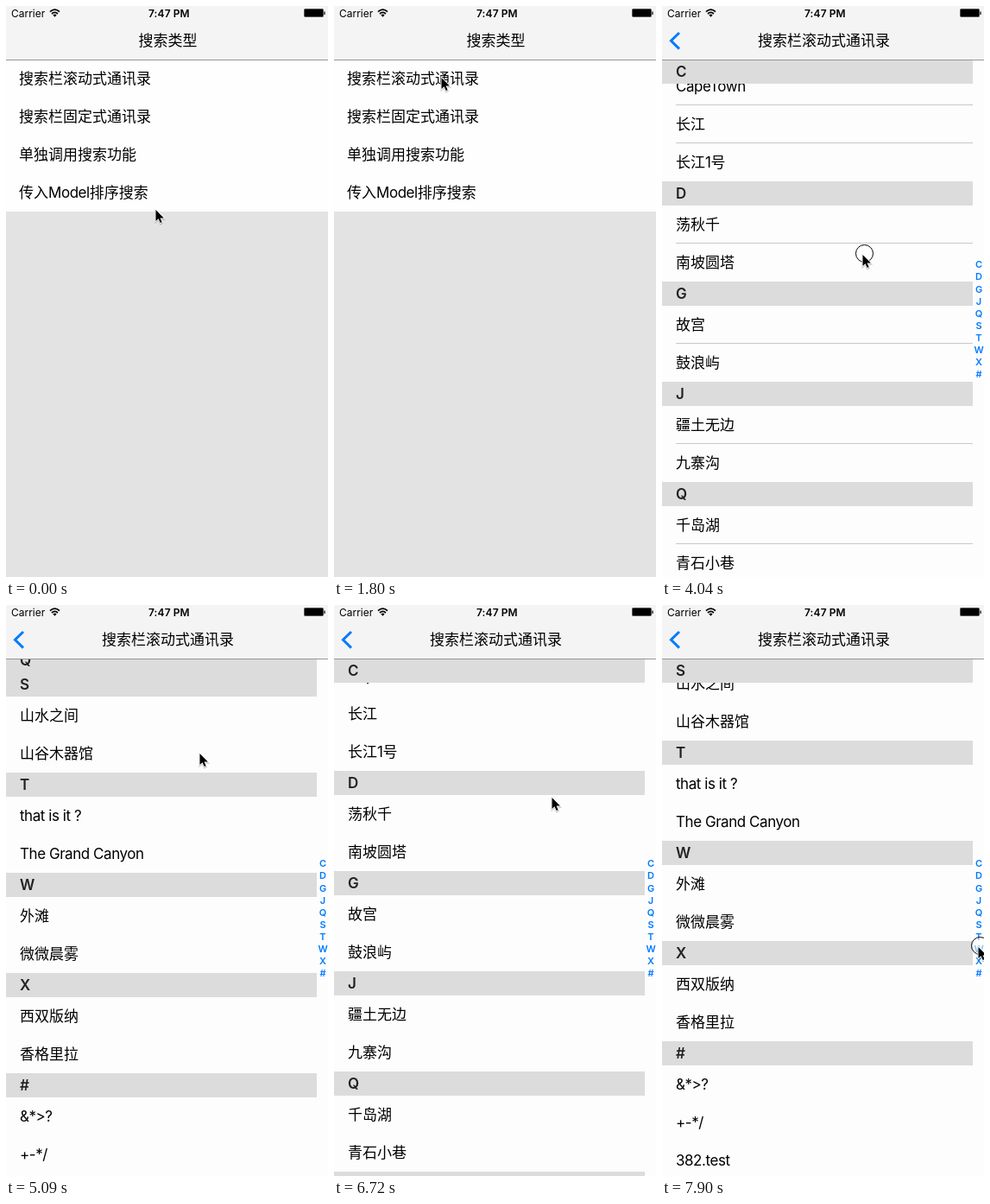
An HTML page that plays this animation: 373x661 px, repeating every 8000 ms.

```html
<!DOCTYPE html>
<html lang="zh-CN">
<head>
<meta charset="utf-8">
<style>
  html, body { margin: 0; width: 100%; height: 100%; overflow: hidden; background: #e3e3e3; }
  #stage { position: absolute; left: 0; top: 0; width: 373px; height: 661px; overflow: hidden;
    font: 17px Inter, "Noto Sans CJK SC", "Noto Sans CJK", sans-serif; color: #000; }
  #stage div, #stage svg { position: absolute; white-space: pre; }
  .latin { letter-spacing: -.45px; }
  .page { left: 0; top: 62px; width: 373px; height: 599px; overflow: hidden; }
  #menu { background: #e3e3e3; }
  #menu .row { left: 0; width: 358px; padding-left: 15px; background: #fefefe; }
  #book { background: #fdfdfd; }
  .row { left: 16px; width: 344px; height: 44px; line-height: 44px; }
  .rule { left: 16px; width: 344px; height: 1px; background: #c8c8c8; }
  .head { left: 0; width: 344px; height: 28px; padding-left: 16px; line-height: 28px;
    background: #dcdcdc; color: #222; font-weight: 600; }
  #search { left: 0; width: 360px; height: 44px; background: #c9c9ce; }
  #search div { left: 8px; top: 8px; width: 344px; height: 28px; border-radius: 5px;
    background: #fefefe; color: #8e8e93; font-size: 14px; line-height: 28px; text-align: center; }
  .key { left: 357px; width: 20px; height: 14px; line-height: 14px; text-align: center;
    font-size: 11px; font-weight: 600; color: #007aff; }
  #bar { left: 0; top: 0; width: 373px; height: 62px; background: #f4f4f4; border-bottom: 1px solid #969696; }
  .title { left: 0; top: 26px; width: 375px; line-height: 28px; text-align: center; font-weight: 500; }
  .status { top: 0; font-size: 12px; line-height: 17px; }
</style>
</head>
<body>
<div id="stage">
  <div id="menu" class="page"></div>
  <div id="book" class="page"><div id="list"><div id="search"><div>搜索</div></div></div></div>
  <div id="bar">
    <div class="status" style="left:6px">Carrier</div>
    <div class="status" style="left:165px;font-weight:600;letter-spacing:.1px">7:47 PM</div>
    <svg width="373" height="62" style="left:0;top:0" fill="none" stroke="#000">
      <path d="M51 6.6Q56.5 1.6 62 6.6M53 9Q56.5 5.8 60 9" stroke-width="1.8"/>
      <path d="M54.4 10.4Q56.5 8.8 58.6 10.4L56.5 12.8Z" fill="#000" stroke="none"/>
      <rect x="345.5" y="3.5" width="22" height="9" rx="1" fill="#000" stroke="#555"/>
      <path d="M369 6.5V10" stroke-width="1.2"/>
      <path id="back" d="M20 31L10.5 40.3L20 49.6" stroke="#007aff" stroke-width="3"/>
    </svg>
    <div id="oldTitle" class="title">搜索类型</div>
    <div id="newTitle" class="title">搜索栏滚动式通讯录</div>
  </div>
  <svg id="mouse" width="40" height="40" style="left:-14px;top:-14px">
    <circle id="ring" cx="16.5" cy="13.5" r="10" fill="#fff" fill-opacity=".5" stroke="#000"/>
    <path d="M14.5 15v13l3-2.8 2.2 4.9 2-.9-2.1-4.7h4.3z" fill="#000" stroke="#fff"
      stroke-width="1.8" paint-order="stroke" style="filter:drop-shadow(0 1px .7px rgba(0,0,0,.3))"/>
  </svg>
</div>
<script>
const TOP = 62, ROW = 44, HEAD = 28, WIDTH = 373, LOOP = 8000;
const REST = TOP + ROW, BOTTOM = 665, KEY_TOP = 292.3, KEY_STEP = 14.1;
const INDEX_DRAG = 7010;
const $ = id => document.getElementById(id);

const sections = {
  C: ['CapeTown', '长江', '长江1号'],
  D: ['荡秋千', '南坡圆塔'],
  G: ['故宫', '鼓浪屿'],
  J: ['疆土无边', '九寨沟'],
  Q: ['千岛湖', '青石小巷'],
  S: ['山水之间', '山谷木器馆'],
  T: ['that is it ?', 'The Grand Canyon'],
  W: ['外滩', '微微晨雾'],
  X: ['西双版纳', '香格里拉'],
  '#': ['&*>?', '+-*/', '382.test']
};

// Places where the pointer turns or rests: [time, x, y]
const stops = [
  [0, 173, 235], [600, 186, 278], [1800, 124, 82], [2300, 124, 82], [3440, 220, 369],
  [3740, 220, 369], [4040, 232, 287], [4500, 224, 171], [5540, 224, 171],
  [6130, 224, 388], [6720, 252, 222], [INDEX_DRAG, 364, 297], [7900, 366, 395]
];
const presses = [[2100, 2250], [3740, 4340], [5690, 6100], [INDEX_DRAG, LOOP]];
const clockStarts = [0, 3290, 5830, 6720, 7010, 7900];

const mix = (a, b, f) => a + (b - a) * f;
const part = (t, from, to) => Math.min(1, Math.max(0, (t - from) / (to - from)));
const smooth = f => f * f * (3 - 2 * f);
const easeOut = f => 1 - (1 - f) ** 2;

function add(parent, cls, text, top) {
  const el = document.createElement('div');
  el.className = cls;
  el.style.top = top + 'px';
  for (const run of text.match(/[ -~]+|[^ -~]+/g) || []) {
    const span = document.createElement('span');
    span.textContent = run;
    if (cls === 'row' && /[ -~]/.test(run)) span.className = 'latin';
    el.append(span);
  }
  parent.append(el);
  return el;
}

const menuRows = ['搜索栏滚动式通讯录', '搜索栏固定式通讯录', '单独调用搜索功能', '传入Model排序搜索']
  .map((text, i) => add($('menu'), 'row', text, i * ROW));

const list = $('list'), heads = [], rules = [];
let height = 0;
Object.entries(sections).forEach(([key, names], i) => {
  const start = height;
  height += HEAD;
  names.forEach((name, n) => {
    add(list, 'row', name, height);
    height += ROW;
    if (n < names.length - 1) rules.push(add(list, 'rule', '', height - 1));
  });
  heads.push({ start, end: height, key });
  add($('book'), 'key', key, KEY_TOP - TOP + i * KEY_STEP);
});
for (const h of heads) h.el = add(list, 'head', h.key, 0);
$('search').style.top = -ROW + 'px';
const END = BOTTOM - height;

// The picture advances in 150 ms steps, restarted at a few points
function step(t) {
  const start = clockStarts.filter(s => s <= t).pop();
  return start + Math.floor((t - start) / 150) * 150;
}

function pointerAt(t) {
  const n = stops.findIndex(s => s[0] > t);
  if (n < 0) return stops[stops.length - 1].slice(1);
  const [t0, x0, y0] = stops[n - 1], [t1, x1, y1] = stops[n];
  const f = smooth(part(t, t0, t1));
  return [Math.round(mix(x0, x1, f)), Math.round(mix(y0, y1, f))];
}

// Screen position of the first section: a flick up, a flick back, then the letter index
function listTop(t, py) {
  if (t >= INDEX_DRAG) {
    const picked = heads[Math.floor((py - KEY_TOP) / KEY_STEP)];
    return Math.max(END, TOP - picked.start);
  }
  const up = mix(REST, END, smooth(part(t, 3748, 5308)));
  return Math.round(mix(up, TOP, easeOut(part(t, 5697, 7002))));
}

const shift = (el, x, y = 0) => { el.style.transform = `translate(${x}px, ${y}px)`; };

function draw(now) {
  const t = step(now % LOOP);
  const [px, py] = pointerAt(t);
  const first = listTop(t, py) - TOP;
  const push = easeOut(part(t, 2150, 2700));

  shift($('menu'), Math.round(-112 * push));
  shift($('book'), Math.round(WIDTH * (1 - push)));
  shift($('oldTitle'), -140 * push);
  shift($('newTitle'), 150 * (1 - push));
  $('oldTitle').style.opacity = Math.max(0, 1 - 1.5 * push);
  $('newTitle').style.opacity = $('back').style.opacity = push;
  menuRows[0].style.background = t >= 2100 ? '#d9d9d9' : '';

  shift(list, 0, first);
  for (const h of heads) {
    const pinned = Math.min(-first, h.end - HEAD);
    shift(h.el, 0, Math.max(h.start, pinned));
  }
  for (const r of rules) r.style.opacity = t < 4640 ? 1 : 0;

  shift($('mouse'), px, py);
  $('ring').style.opacity = presses.some(([a, b]) => t >= a && t < b) ? 1 : 0;
}

const began = performance.now();
(function tick() {
  draw(performance.now() - began);
  requestAnimationFrame(tick);
})();
</script>
</body>
</html>
```
